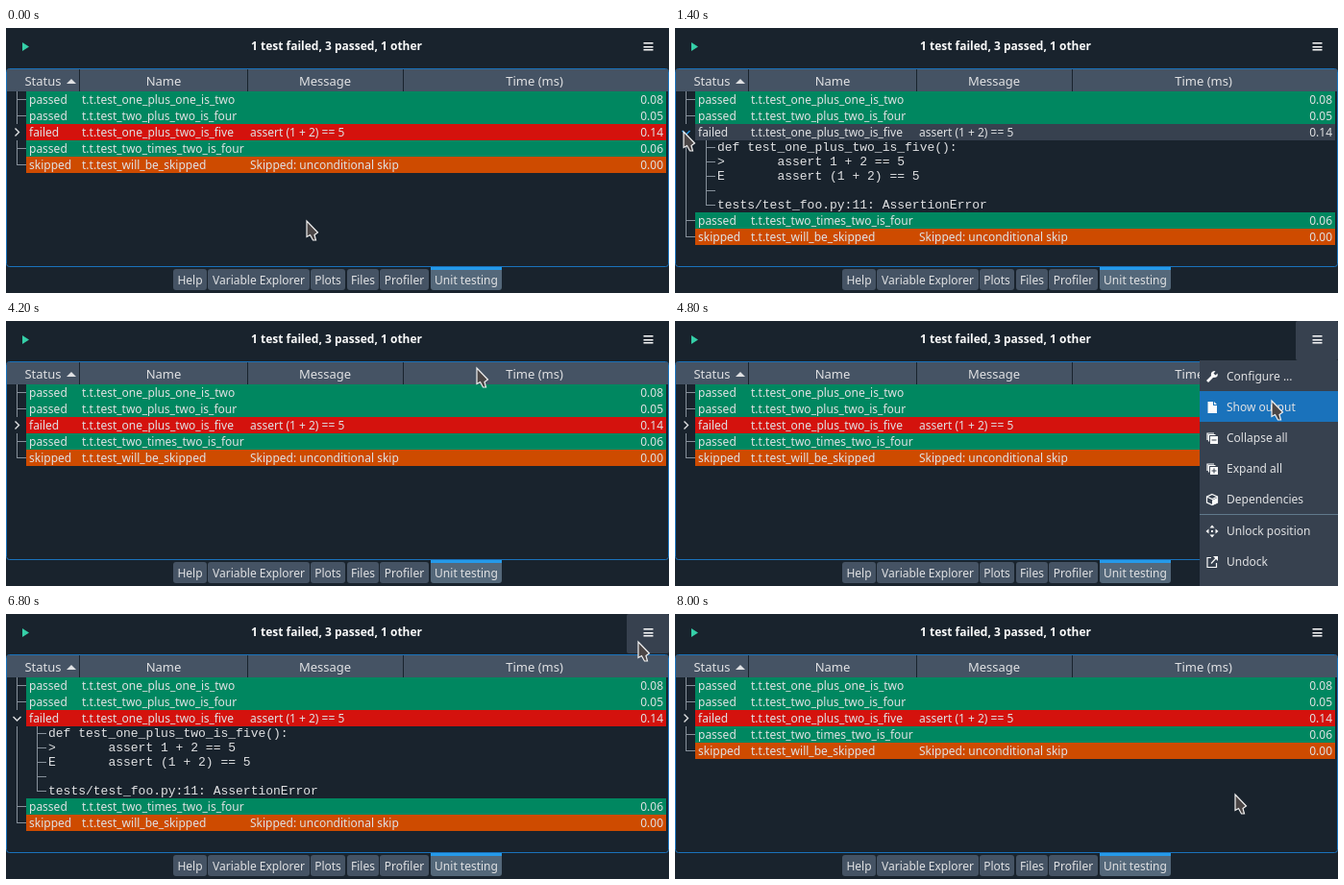
Animation of 690 by 276 pixels, one loop 9000 ms. Source, as an HTML page with a canvas:

```html
<!DOCTYPE html>
<html lang="en">
<head>
<meta charset="utf-8">
<title>Unit testing pane</title>
<style>
html, body { margin: 0; width: 100%; height: 100%; overflow: hidden; background: #19232d; }
canvas { display: block; }
</style>
</head>
<body>
<canvas id="stage" width="690" height="276"></canvas>
<script>
const ctx = document.getElementById('stage').getContext('2d');
const LOOP = 9000, STEP = 200;
const BG = '#19232d', PANEL = '#37414f', HEADER = '#455364', TEXT = '#e0e1e3';
const BLUE = '#1a72bb', LINE = '#87919b', WHITE = '#fafafa';
const COLORS = { passed: '#008760', failed: '#d4120d', skipped: '#ce4b00' };
const SANS = '12px "Noto Sans", sans-serif';
const HEAD = '13px "Noto Sans", sans-serif';
const BOLD = 'bold ' + SANS;
const MONO = '13px "Liberation Mono", monospace';

const TESTS = [
  ['passed', 't.t.test_one_plus_one_is_two', '', '0.08'],
  ['passed', 't.t.test_two_plus_two_is_four', '', '0.05'],
  ['failed', 't.t.test_one_plus_two_is_five', 'assert (1 + 2) == 5', '0.14'],
  ['passed', 't.t.test_two_times_two_is_four', '', '0.06'],
  ['skipped', 't.t.test_will_be_skipped', 'Skipped: unconditional skip', '0.00'],
];
const TRACE = [
  'def test_one_plus_two_is_five():',
  '>       assert 1 + 2 == 5',
  'E       assert (1 + 2) == 5',
  '',
  'tests/test_foo.py:11: AssertionError',
];
const TABS = [['Help', 174, 209], ['Variable Explorer', 210, 316], ['Plots', 317, 353],
  ['Files', 355, 388], ['Profiler', 389, 440], ['Unit testing', 442, 516]];

// label, centre y, filled icon path, stroked icon path (12 x 12 box)
const STACK = 'M4 4H12V12H4Z', BACK = 'M1 8V1H8M2.5 9.5V2.5H9.5';
const MENU = [
  ['Configure ...', 57, 'M0 10L5 5Q4 1 8 0L9.500 .5L7.500 2.500L9.500 4.500L11.500 2.500Q13 7 7 7L2 12Z', ''],
  ['Show output', 89, 'M1.500 0H7V4H11V12H1.500Z M8 0L11 3H8Z', ''],
  ['Collapse all', 121, STACK, BACK],
  ['Expand all', 153, STACK, BACK],
  ['Dependencies', 185, 'M6 6.500L11.500 4V9.500L6 12Z', 'M6 .5L11.500 3V9L6 11.500L.5 9V3ZM.5 3L6 5.500L11.500 3'],
  ['Unlock position', 218, 'M6 -.5L8.500 2.500H3.500ZM6 12.500L8.500 9.500H3.500ZM-.5 6L2.500 3.500V8.500ZM12.500 6L9.500 3.500V8.500ZM5 5H7V7H5Z', ''],
  ['Undock', 250, 'M7 0H12V5Z', 'M5 1.500H1V11.500H10.500V7M5 7.500L10.500 1.500'],
];

// time, pointer x, pointer y
const POINTER = [
  [200, 312, 200], [1200, 8, 107], [3800, 8, 107], [4400, 657, 28], [4600, 657, 28],
  [4800, 620, 82], [5000, 600, 122], [5200, 585, 155], [5400, 578, 178], [5800, 582, 187],
  [6200, 582, 187], [6800, 657, 28], [7000, 657, 28], [7200, 622, 82], [7400, 598, 121],
  [7600, 589, 152], [8000, 582, 187],
];

function pointerAt(t) {
  const next = POINTER.findIndex(key => key[0] > t);
  if (next < 1) return (next ? POINTER.at(-1) : POINTER[0]).slice(1);
  const [t0, x0, y0] = POINTER[next - 1], [t1, x1, y1] = POINTER[next];
  const p = (t - t0) / (t1 - t0), e = p * p * (3 - 2 * p);
  return [x0 + (x1 - x0) * e, y0 + (y1 - y0) * e].map(Math.round);
}

const within = (t, from, to) => t >= from && t < to;

function box(x, y, w, h, color, radius = 0) {
  ctx.fillStyle = color;
  ctx.beginPath();
  ctx.roundRect(x, y, w, h, radius);
  ctx.fill();
}

function text(str, x, y, font = SANS, align = 'left', color = TEXT) {
  ctx.font = font;
  ctx.textAlign = align;
  ctx.fillStyle = color;
  ctx.fillText(str, x, y);
}

function shape(path, x, y, fill, stroke, width = 1) {
  ctx.save();
  ctx.translate(x, y);
  const p = new Path2D(path);
  if (fill) { ctx.fillStyle = fill; ctx.fill(p); }
  if (stroke) { ctx.strokeStyle = stroke; ctx.lineWidth = width; ctx.stroke(p); }
  ctx.restore();
}

function branch(x, y, h, last) {
  const mid = h >> 1;
  box(x, y, 1, last ? mid + 1 : h, LINE);
  box(x, y + mid, 10, 1, LINE);
}

function drawFrame(buttonLit) {
  box(0, 0, 690, 276, BG);
  if (buttonLit) box(646, 0, 44, 41, PANEL, 2);
  shape('M0 0L7 4.500L0 9Z', 17, 15, '#35cfa8');
  text('1 test failed, 3 passed, 1 other', 344, 23, BOLD, 'center', WHITE);
  for (const y of [15, 19, 22]) box(663.5, y, 10, 1.5, WHITE);

  ctx.strokeStyle = BLUE;
  ctx.lineWidth = 1;
  ctx.beginPath();
  ctx.roundRect(.5, 42.5, 689, 206, 3);
  ctx.stroke();
  for (const [label, x, right, mid] of [['Status', 1, 76, 38.5], ['Name', 77, 251, 164],
    ['Message', 252, 413, 332], ['Time (ms)', 414, 689, 550]]) {
    box(x, 43, right - x, 23, HEADER);
    text(label, mid, 60, HEAD, 'center');
  }
  shape('M0 5L5 0L10 5Z', 63, 53, TEXT);

  for (const [label, x, right] of TABS) {
    const active = label === 'Unit testing';
    box(x, active ? 249 : 251, right - x, active ? 24 : 22, active ? '#54687a' : HEADER, 3);
    if (active) box(x, 249, right - x, 3, '#259ae9');
    text(label, (x + right) / 2, 267, SANS, 'center');
  }
}

function drawTree(expanded, px, py) {
  let y = 66;
  const hovered = h => py - 2 >= y && py - 2 < y + h;
  TESTS.forEach(([status, name, message, time], i) => {
    const hover = hovered(17), failed = status === 'failed';
    box(21, y, 666, 17, hover ? PANEL : COLORS[status]);
    text(status, 24, y + 13);
    text(name, 79, y + 13);
    text(message, 254, y + 13);
    text(time, 684, y + 13, SANS, 'right');
    if (failed) {
      shape(expanded ? 'M0 2.500L4 6.500L8 2.500' : 'M2 0L6 4L2 8', 7.5, y + 4.5, null,
        hover && px < 21 ? '#259ae9' : TEXT, 1.4);
    } else {
      branch(11, y, 17, i === TESTS.length - 1);
    }
    y += 17;
    if (failed && expanded) TRACE.forEach((line, n) => {
      if (hovered(15)) box(42, y, 645, 15, PANEL);
      box(11, y, 1, 15, LINE);
      branch(32, y, 15, n === TRACE.length - 1);
      text(line, 44, y + 11, MONO);
      y += 15;
    });
  });
}

function drawMenu(alpha, hoverLabel) {
  ctx.globalAlpha = alpha;
  // Fade the menu as one sheet: only the active item gets its own fill.
  box(546, 41, 144, 235, PANEL);
  for (const [label, mid, fill, stroke] of MENU) {
    if (label === hoverLabel) box(546, mid - 16, 144, 32, BLUE);
    shape(fill, 553, mid - 5, WHITE);
    if (stroke) shape(stroke, 553, mid - 5, null, WHITE, 1.2);
    if (label === 'Collapse all' || label === 'Expand all') {
      box(558.5, mid + 2.5, 5, 1, PANEL);
      if (label === 'Expand all') box(560.5, mid + .5, 1, 5, PANEL);
    }
    text(label, 574, mid + 5);
  }
  box(546, 201, 144, 1, '#60798b');
  ctx.globalAlpha = 1;
}

function draw(t) {
  const [px, py] = pointerAt(t);
  const open = within(t, 4600, 5400) || within(t, 7000, 7600);
  const fading = within(t, 5400, 5600) || within(t, 7600, 7800);
  const expanded = within(t, 1400, 3000) || within(t, 5400, 7600);
  drawFrame(open || (px >= 646 && py < 41));
  drawTree(expanded, px, open ? 0 : py);
  if (open || fading) {
    const under = MENU.find(item => Math.abs(item[1] - py) <= 16);
    const chosen = t < 6000 ? 'Expand all' : 'Collapse all';
    drawMenu(open ? 1 : .35, fading ? chosen : under && under[0]);
  }
  shape('M1 1V17.500L4.500 15.500L7.500 21H10.500L9 15.500L12.500 13Z', px, py, '#4b4646', '#f0f0f0', 1.2);
}

function tick(now) {
  draw(Math.floor(now % LOOP / STEP) * STEP);
  requestAnimationFrame(tick);
}
requestAnimationFrame(tick);
</script>
</body>
</html>
```
